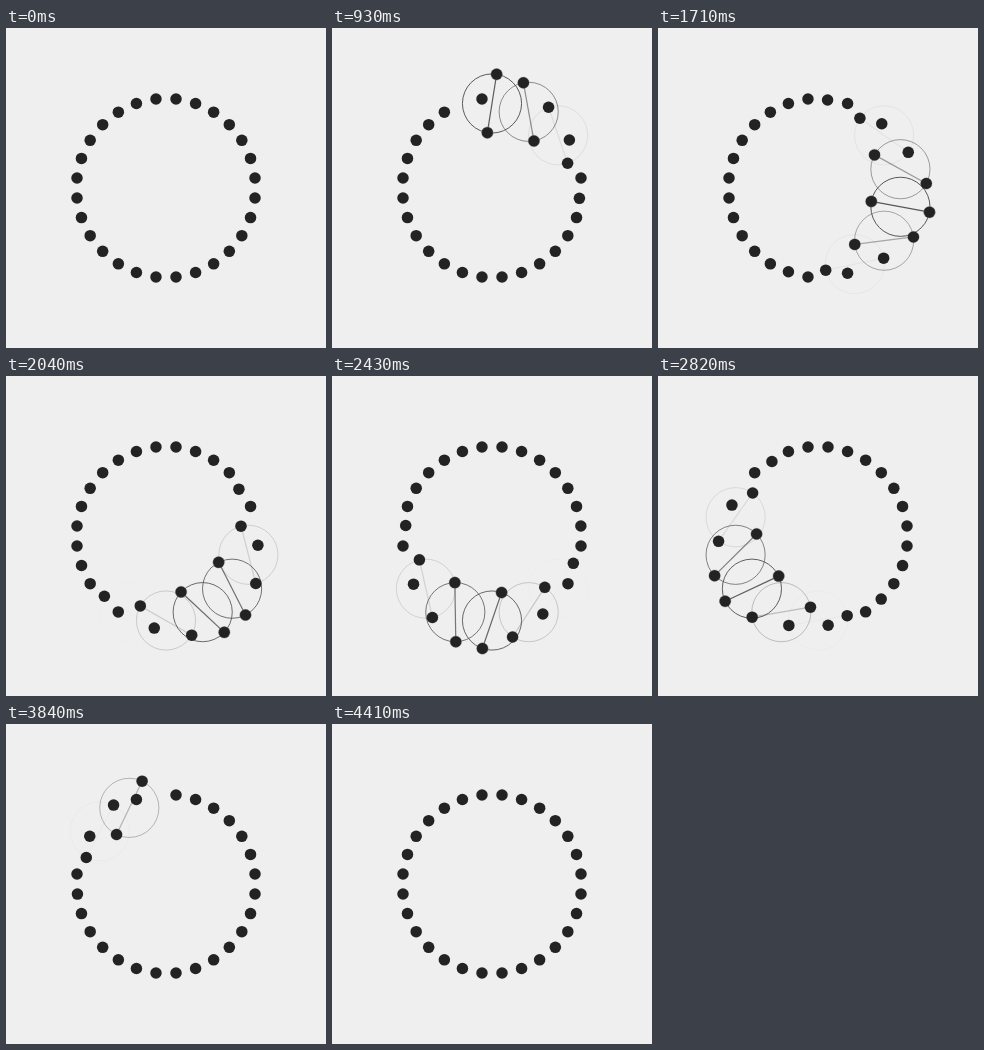
An HTML page with a canvas for the animation above (5.17 s loop, 320x320 px).

```html
<!DOCTYPE html>
<html lang="en">
<head>
<meta charset="utf-8">
<title>Swapping dots</title>
<style>
html, body { margin: 0; width: 100%; height: 100%; overflow: hidden; background: #efefef; }
canvas { display: block; width: 100vw; height: 100vh; }
</style>
</head>
<body>
<canvas></canvas>
<script>
const canvas = document.querySelector('canvas');
const ctx = canvas.getContext('2d');

const SIZE = 320, LOOP = 5170, TICK = 30;
const PAIRS = 14, RING = 89.55, DOT = 5.75;
const START = 81, STAGGER = 207.8, DURATION = 1617;

// Partners sit three places apart on a ring of 28 dots.
const HALF_ANGLE = 3 * Math.PI / 28;
const ORBIT = RING * Math.sin(HALF_ANGLE);
const CENTRE = RING * Math.cos(HALF_ANGLE);

const ease = u => u - Math.sin(2 * Math.PI * u) / (2 * Math.PI);
const clamp = u => Math.min(1, Math.max(0, u));

function pairAt(j, time) {
  const place = j * 2 * Math.PI / PAIRS;
  const turn = ease(clamp((time - START - j * STAGGER) / DURATION));
  const angle = place + Math.PI * turn;
  const x = SIZE / 2 + CENTRE * Math.sin(place);
  const y = SIZE / 2 - CENTRE * Math.cos(place);
  const dx = ORBIT * Math.cos(angle);
  const dy = ORBIT * Math.sin(angle);
  return {
    x, y,
    ends: [[x - dx, y - dy], [x + dx, y + dy]],
    glow: Math.sin(Math.PI * turn) ** 2
  };
}

function circle(x, y, r) {
  ctx.beginPath();
  ctx.arc(x, y, r, 0, 2 * Math.PI);
}

function drawGuides({ x, y, ends, glow }) {
  if (glow < 0.005) return;
  ctx.strokeStyle = `rgba(70, 70, 70, ${glow * 0.9})`;
  ctx.lineWidth = 1;
  circle(x, y, ORBIT);
  ctx.stroke();
  ctx.lineWidth = 1.2;
  ctx.beginPath();
  ctx.moveTo(...ends[0]);
  ctx.lineTo(...ends[1]);
  ctx.stroke();
}

function drawDots({ ends, glow }) {
  ctx.fillStyle = '#232323';
  ctx.strokeStyle = `rgba(110, 110, 110, ${glow * 0.5})`;
  ctx.lineWidth = 0.8;
  for (const [x, y] of ends) {
    circle(x, y, DOT);
    ctx.fill();
    if (glow > 0.005) ctx.stroke();
  }
}

function resize() {
  const ratio = window.devicePixelRatio || 1;
  canvas.width = Math.round(innerWidth * ratio);
  canvas.height = Math.round(innerHeight * ratio);
}

function draw(now) {
  const time = Math.floor((now % LOOP) / TICK) * TICK;
  ctx.setTransform(canvas.width / SIZE, 0, 0, canvas.height / SIZE, 0, 0);
  ctx.fillStyle = '#efefef';
  ctx.fillRect(0, 0, SIZE, SIZE);
  const pairs = Array.from({ length: PAIRS }, (_, j) => pairAt(j, time));
  pairs.forEach(drawGuides);
  pairs.forEach(drawDots);
}

let origin = null;
function frame() {
  const now = performance.now();
  if (origin === null) origin = now;
  draw(now - origin);
  requestAnimationFrame(frame);
}

addEventListener('resize', resize);
resize();
frame();
</script>
</body>
</html>
```
